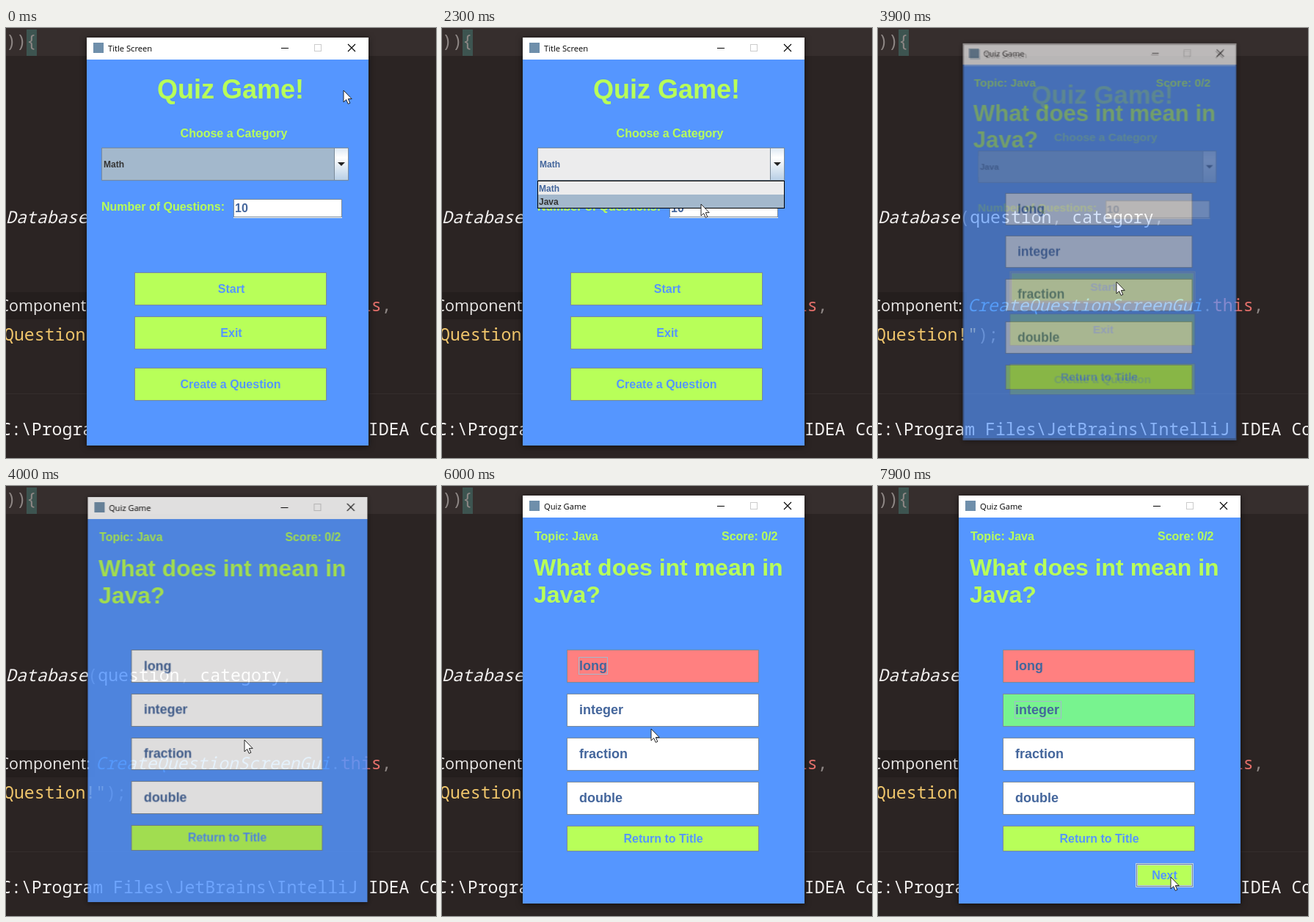
Write an HTML page that moves like this. It is 586 px wide and 586 px high and loops after 8 s.

```html
<!DOCTYPE html>
<html lang="en">
<head>
<meta charset="utf-8">
<title>Quiz Game</title>
<style>
  html, body { margin: 0; width: 100%; height: 100%; overflow: hidden; background: #2b2423; }
  svg { display: block; width: 586px; height: 586px; }
  rect, .crisp { shape-rendering: crispEdges; }

  .code { font: 23.2px "Noto Sans Mono", "DejaVu Sans Mono", monospace; fill: #f2f0ef; white-space: pre; }
  .em { font-style: italic; }
  .dim { fill: #8e8785; }
  .blue { fill: #57a5e6; }
  .red { fill: #e5706b; }
  .gold { fill: #efc56b; }
  .hint { font: 21.5px "Open Sans", sans-serif; fill: #eceae9; }

  .caption { font: 11.2px "Open Sans", sans-serif; fill: #000; }
  .ui { font: bold 16px "Liberation Sans", Arial, sans-serif; fill: #b8ff59; }
  .mid { text-anchor: middle; }
  .big { font-size: 36px; }
  .ask { font-size: 32px; }
  .small { font-size: 12px; }
  .answer { font-size: 18px; }
  .ink { fill: #44669c; }
  .dark { fill: #333; }
  .on-lime { fill: #5596ff; }

  .btn { stroke: #7a8a99; }
  .lime { fill: #b8ff59; }
  .white { fill: #fff; }
  .wrong { fill: #ff8080; }
  .right { fill: #78f38f; }
  .focus { fill: none; stroke: #a3b8cc; }
  .ring { fill: none; stroke: #c2d4e6; }
  .ring .core { stroke: #7a8a99; }
  .frame { filter: drop-shadow(0 1px 4px rgba(0, 0, 0, .6)); }

  /* 1.25% of the loop is 100 ms */
  .anim { animation: 8s step-end infinite; }
  .window { transform-origin: 302px 291px; }
  #title { animation-name: close; }
  #quiz { animation-name: open; }
  #popup { animation-name: popup; }
  #picked { animation-name: picked; }
  #startRing { animation-name: start-ring; }
  #longRing { animation-name: long-ring; }
  #longRed { animation-name: long-red; }
  #longFocus { animation-name: long-focus; }
  #integerRing { animation-name: integer-ring; }
  #integerGreen { animation-name: integer-green; }
  #nextRing { animation-name: next-ring; }
  #cursor { animation-name: cursor; }

  @keyframes close {
    0% { opacity: 1; transform: none; }
    47.5% { opacity: .8; transform: scale(.985); }
    48.75% { opacity: .4; transform: scale(.965); }
    50%, 100% { opacity: 0; transform: scale(.95); }
  }
  @keyframes open {
    0% { opacity: 0; transform: scale(.95); }
    48.75% { opacity: .45; transform: scale(.973); }
    50% { opacity: .85; transform: scale(.993); }
    51.25%, 100% { opacity: 1; transform: none; }
  }
  @keyframes popup { 0% { opacity: 0 } 22.5% { opacity: 1 } 32.5%, 100% { opacity: 0 } }
  @keyframes picked { 0% { opacity: 0 } 32.5%, 100% { opacity: 1 } }
  @keyframes start-ring { 0% { opacity: 0 } 40%, 100% { opacity: 1 } }
  @keyframes long-ring { 0% { opacity: 0 } 55% { opacity: 1 } 71.25%, 100% { opacity: 0 } }
  @keyframes long-red { 0% { opacity: 0 } 67.5%, 100% { opacity: 1 } }
  @keyframes long-focus { 0% { opacity: 0 } 67.5% { opacity: 1 } 83.75%, 100% { opacity: 0 } }
  @keyframes integer-ring {
    0% { opacity: 0 } 72.5% { opacity: 1 } 75% { opacity: 0 }
    76.25% { opacity: 1 } 90%, 100% { opacity: 0 }
  }
  @keyframes integer-green { 0% { opacity: 0 } 83.75%, 100% { opacity: 1 } }
  @keyframes next-ring { 0% { opacity: 0 } 97.5%, 100% { opacity: 1 } }
  @keyframes cursor {
    0% { transform: translate(460px, 85px); }
    16.25% { transform: translate(460px, 85px); animation-timing-function: steps(4); }
    21.25% { transform: translate(455px, 183px); }
    23.75% { transform: translate(455px, 183px); animation-timing-function: steps(3); }
    27.5% { transform: translate(353px, 240px); }
    31.25% { transform: translate(353px, 240px); animation-timing-function: steps(6); }
    38.75% { transform: translate(332px, 330px); animation-timing-function: steps(3); }
    42.5% { transform: translate(325px, 346px); }
    50% { transform: translate(325px, 346px); animation-timing-function: steps(4); }
    55% { transform: translate(348px, 262px); }
    56.25% { transform: translate(348px, 262px); animation-timing-function: steps(8); }
    66.25% { transform: translate(340px, 250px); }
    68.75% { transform: translate(340px, 250px); animation-timing-function: steps(5); }
    75% { transform: translate(285px, 331px); animation-timing-function: steps(5); }
    81.25% { transform: translate(268px, 309px); }
    88.75% { transform: translate(268px, 309px); animation-timing-function: steps(7); }
    97.5%, 100% { transform: translate(399px, 533px); }
  }
</style>
</head>
<body>
<svg viewBox="0 0 586 586">
  <defs>
    <g id="chrome">
      <rect class="frame" x="110" y="13" width="384" height="556" fill="#5596ff"/>
      <rect x="110" y="13" width="384" height="30" fill="#fff"/>
      <rect x="119" y="20" width="14" height="14" fill="#6f8fab"/>
      <path class="crisp" d="M375 27.5h10" stroke="#000"/>
      <rect x="420.5" y="22.5" width="9" height="9" fill="none" stroke="#ccc"/>
      <path d="M466 22l10 10m0-10l-10 10" stroke="#000" stroke-width="1.1"/>
    </g>
    <g id="ring" class="ring">
      <rect width="261" height="44"/>
      <rect class="core" x="1" y="1" width="259" height="42"/>
      <rect x="2" y="2" width="257" height="40"/>
    </g>
    <linearGradient id="steel" x2="0" y2="1">
      <stop stop-color="#dde8f3"/>
      <stop offset=".3" stop-color="#fff"/>
      <stop offset="1" stop-color="#b8cfe5"/>
    </linearGradient>
  </defs>

  <!-- editor -->
  <rect width="586" height="586" fill="#2b2423"/>
  <rect width="586" height="38" fill="#362e2d"/>
  <rect x="28" y="2" width="14" height="36" fill="#3d5450"/>
  <rect y="360" width="121" height="37" fill="#241e1d"/>
  <rect y="498" width="586" height="1" fill="#352d2c"/>
  <g class="code">
    <text class="dim" x="0" y="26">)){</text>
    <text x="0" y="266"><tspan class="em">Database</tspan><tspan class="dim">(</tspan>question<tspan class="dim">, </tspan>category<tspan class="dim">,</tspan></text>
    <text x="122" y="386"><tspan class="em blue">CreateQuestionScreenGui</tspan><tspan class="dim">.</tspan><tspan class="red">this</tspan><tspan class="dim">,</tspan></text>
    <text x="-3" y="426"><tspan class="gold">Question!"</tspan><tspan class="dim">);</tspan></text>
    <text x="-7" y="555">C:\Program Files\JetBrains\IntelliJ IDEA Community</text>
  </g>
  <text class="hint" x="115" y="386" text-anchor="end">Component:</text>

  <g id="title" class="anim window">
    <use href="#chrome"/>
    <text class="caption" x="139" y="32">Title Screen</text>
    <g class="ui">
      <text class="big mid" x="306" y="96">Quiz Game!</text>
      <text class="mid" x="310.5" y="149">Choose a Category</text>
      <text x="130" y="249">Number of Questions:</text>

      <rect x="310" y="233" width="148" height="26" fill="#fff"/>
      <path class="crisp" d="M310.5 258V233.5H457.5V257.5H311" fill="none" stroke="#7a8a99"/>
      <text class="ink" x="312" y="251">10</text>

      <rect class="btn" x="130.5" y="163.5" width="336" height="44" fill="#a3b8cc"/>
      <rect class="btn" x="447.5" y="163.5" width="19" height="44" fill="url(#steel)"/>
      <path d="M452 183h10l-5 5z" fill="#222"/>
      <text class="small dark" x="133" y="190">Math</text>
      <g id="picked" class="anim">
        <rect x="131" y="170" width="60" height="30" fill="#a3b8cc"/>
        <text class="small dark" x="133" y="190">Java</text>
      </g>

      <rect class="btn lime" x="175.5" y="333.5" width="261" height="44"/>
      <rect class="btn lime" x="175.5" y="393.5" width="261" height="44"/>
      <rect class="btn lime" x="175.5" y="463.5" width="261" height="44"/>
      <g id="startRing" class="anim"><use href="#ring" x="175.5" y="333.5"/></g>
      <g class="on-lime mid">
        <text x="307" y="361">Start</text>
        <text x="307" y="421">Exit</text>
        <text x="306" y="491">Create a Question</text>
      </g>

      <g id="popup" class="anim">
        <rect x="131" y="164" width="316" height="43" fill="#ececed"/>
        <text class="small ink" x="133" y="190">Math</text>
        <rect x="130.5" y="208.5" width="336" height="37" fill="#ececed" stroke="#000"/>
        <rect x="131" y="227" width="335" height="18" fill="#a3b8cc"/>
        <text class="small ink" x="132" y="223">Math</text>
        <text class="small dark" x="132" y="241">Java</text>
      </g>
    </g>
  </g>

  <g id="quiz" class="anim window">
    <use href="#chrome"/>
    <text class="caption" x="139" y="32">Quiz Game</text>
    <g class="ui">
      <text x="126" y="74">Topic: Java</text>
      <text x="381" y="74">Score: 0/2</text>
      <text class="ask" x="125" y="122">What does int mean in</text>
      <text class="ask" x="128" y="159" dx="-3">Java?</text>

      <rect class="btn white" x="170.5" y="223.5" width="261" height="44"/>
      <rect class="btn white" x="170.5" y="283.5" width="261" height="44"/>
      <rect class="btn white" x="170.5" y="343.5" width="261" height="44"/>
      <rect class="btn white" x="170.5" y="403.5" width="261" height="44"/>
      <rect class="btn lime" x="170.5" y="463.5" width="261" height="34"/>

      <rect id="longRed" class="anim btn wrong" x="170.5" y="223.5" width="261" height="44"/>
      <rect id="longFocus" class="anim focus" x="186.5" y="233.5" width="39" height="23"/>
      <g id="longRing" class="anim"><use href="#ring" x="170.5" y="223.5"/></g>

      <g id="integerGreen" class="anim">
        <rect class="btn right" x="170.5" y="283.5" width="261" height="44"/>
        <rect class="focus" x="186.5" y="293.5" width="63" height="23"/>
        <rect class="btn lime" x="351.5" y="514.5" width="78" height="32"/>
        <g id="nextRing" class="anim ring">
          <rect x="351.5" y="514.5" width="78" height="32"/>
          <rect class="core" x="352.5" y="515.5" width="76" height="30"/>
          <rect x="353.5" y="516.5" width="74" height="28"/>
        </g>
        <text class="on-lime mid" x="390.5" y="536">Next</text>
      </g>
      <g id="integerRing" class="anim"><use href="#ring" x="170.5" y="283.5"/></g>

      <g class="answer ink">
        <text x="187" y="251">long</text>
        <text x="187" y="311">integer</text>
        <text x="187" y="371">fraction</text>
        <text x="187" y="431">double</text>
      </g>
      <text class="on-lime mid" x="301.5" y="486">Return to Title</text>
    </g>
  </g>

  <g id="cursor" class="anim">
    <path d="M0 0V16L3.7 12.6L6.2 18.4L8.8 17.3L6.3 11.6H11.2Z" fill="#fff" stroke="#111" stroke-width=".9"/>
  </g>
</svg>
</body>
</html>
```
